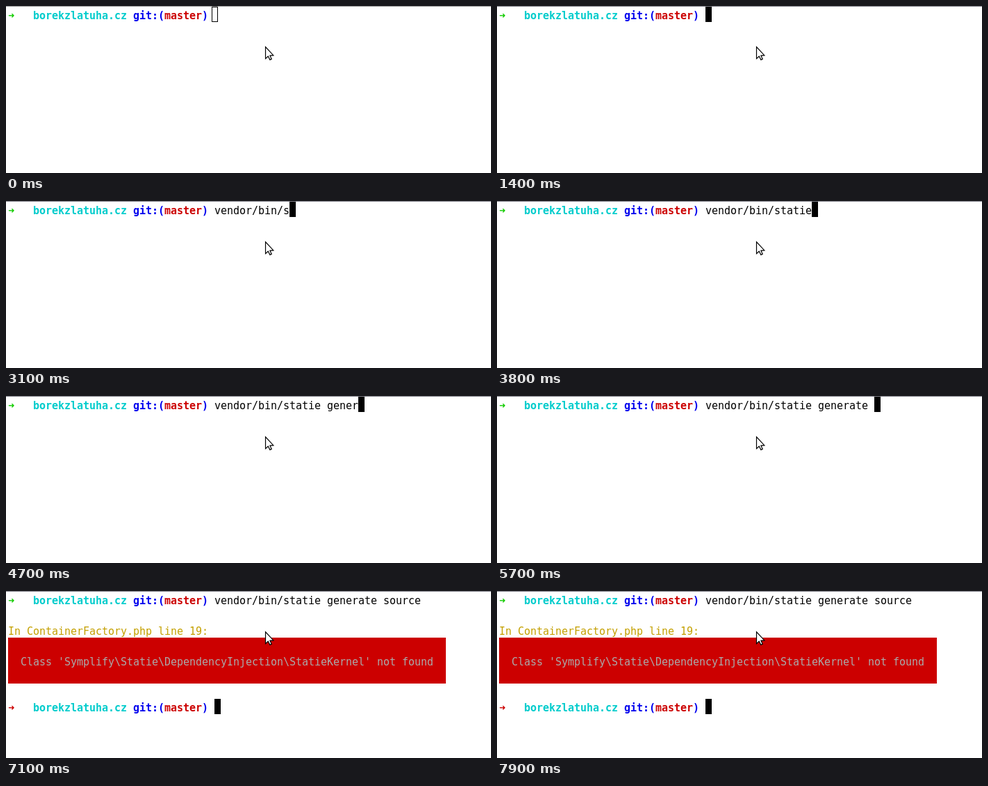
Write an HTML page that moves like this. It is 698x240 px and loops after 8 s.

```html
<!DOCTYPE html>
<html lang="en">
<head>
<meta charset="utf-8">
<title>Terminal</title>
<style>
html, body { margin: 0; width: 100%; height: 100%; overflow: hidden; background: #fff; }
#stage { position: relative; width: 698px; height: 240px; overflow: hidden;
  font: 15px/22px "DejaVu Sans Mono", monospace; letter-spacing: calc(9px - 1ch); }
#stage > * { position: absolute; }
#edge { left: 0; top: 0; width: 698px; height: 1px; }
.run { white-space: pre; }
.bold { font-weight: bold; }
#cursor { width: 9px; height: 22px; box-sizing: border-box; border: 1px solid #000; }
#alert { left: 3px; top: 67px; width: 630px; height: 66px; background: #c00; }
#pointer { left: 0; top: 0; }
</style>
</head>
<body>
<div id="stage">
  <div id="edge"></div>
  <div id="alert"></div>
  <div id="cursor"></div>
  <svg id="pointer" width="698" height="240">
    <path d="M373.5 58.8V75.6L377.2 72.2L379.9 77.4L382.2 76.3L379.9 71.3L384.8 70.9Z"
      fill="#fff" stroke="#000" stroke-width="1.2"/>
  </svg>
</div>
<script>
const LOOP = 8000, FOCUS = 300, TAB = 6250, ENTER = 7000, OUTPUT = 7100;
const BLINK = 505, KEY_GAP = 149;
const COMMAND = "vendor/bin/statie generate source";
const PROMPT_COL = 33;
// Two bursts of typing at a steady pace; the tab key completes the last word.
const BURSTS = [{ from: 1404, keys: 27 }, { from: 5769, keys: 3 }];

const $ = id => document.getElementById(id);
const stage = $("stage"), edge = $("edge"), alertBox = $("alert"), cursor = $("cursor");
const colX = col => 3 + col * 9;
const rowY = row => 1 + row * 22;
const show = (el, on) => { el.style.visibility = on ? "visible" : "hidden"; };

function run(row, col, text, color, bold) {
  const el = document.createElement("span");
  el.className = bold ? "run bold" : "run";
  el.textContent = text;
  el.style.left = colX(col) + "px";
  el.style.top = rowY(row) + 2 + "px";
  el.style.color = color;
  stage.insertBefore(el, cursor);
  return el;
}

function prompt(row, arrowColor) {
  return [
    run(row, 0, "➜", arrowColor, true),
    run(row, 4, "borekzlatuha.cz", "#00cccc", true),
    run(row, 20, "git:(", "#0000ee", true),
    run(row, 25, "master", "#cc0000", true),
    run(row, 31, ")", "#0000ee", true)
  ];
}

prompt(0, "#1c0");
const command = run(0, PROMPT_COL, "", "#000");
const slash = run(0, PROMPT_COL + COMMAND.length, "/", "#000", true);
const output = [
  alertBox,
  run(2, 0, "In ContainerFactory.php line 19:", "#c4a000"),
  run(4, 2, "Class 'Symplify\\Statie\\DependencyInjection\\StatieKernel' not found", "#aaa"),
  ...prompt(7, "#cc0000")
];

// Number of letters on the line and the time of the latest change.
function typing(t) {
  let count = 0, last = FOCUS;
  for (const { from, keys } of BURSTS) {
    if (t < from) break;
    const n = Math.min(keys, Math.floor((t - from) / KEY_GAP) + 1);
    count += n;
    last = from + (n - 1) * KEY_GAP;
  }
  return t < TAB ? { count, last } : { count: COMMAND.length, last: TAB };
}

function placeCursor(x, row, solid, on) {
  cursor.style.left = x + "px";
  cursor.style.top = rowY(row) + "px";
  cursor.style.background = solid ? "#000" : "none";
  show(cursor, on);
}

function draw(t) {
  const focused = t >= FOCUS;
  const { count, last } = typing(t);
  const slashOn = t >= TAB && t < ENTER;
  edge.style.background = focused ? "#7f7f87" : "#999";
  command.textContent = COMMAND.slice(0, count);
  show(slash, slashOn);
  output.forEach(el => show(el, t >= OUTPUT));

  const lit = Math.floor((t - last) / BLINK) % 2 === 0;
  if (!focused) placeCursor(296, 0, false, true);
  else if (t >= OUTPUT) placeCursor(colX(PROMPT_COL), 7, true, true);
  else if (t >= ENTER) placeCursor(colX(0), 1, true, true);
  else placeCursor(colX(PROMPT_COL + count + slashOn), 0, true, lit);
}

const start = performance.now();
function tick() {
  draw((performance.now() - start) % LOOP);
  requestAnimationFrame(tick);
}
tick();
</script>
</body>
</html>
```
